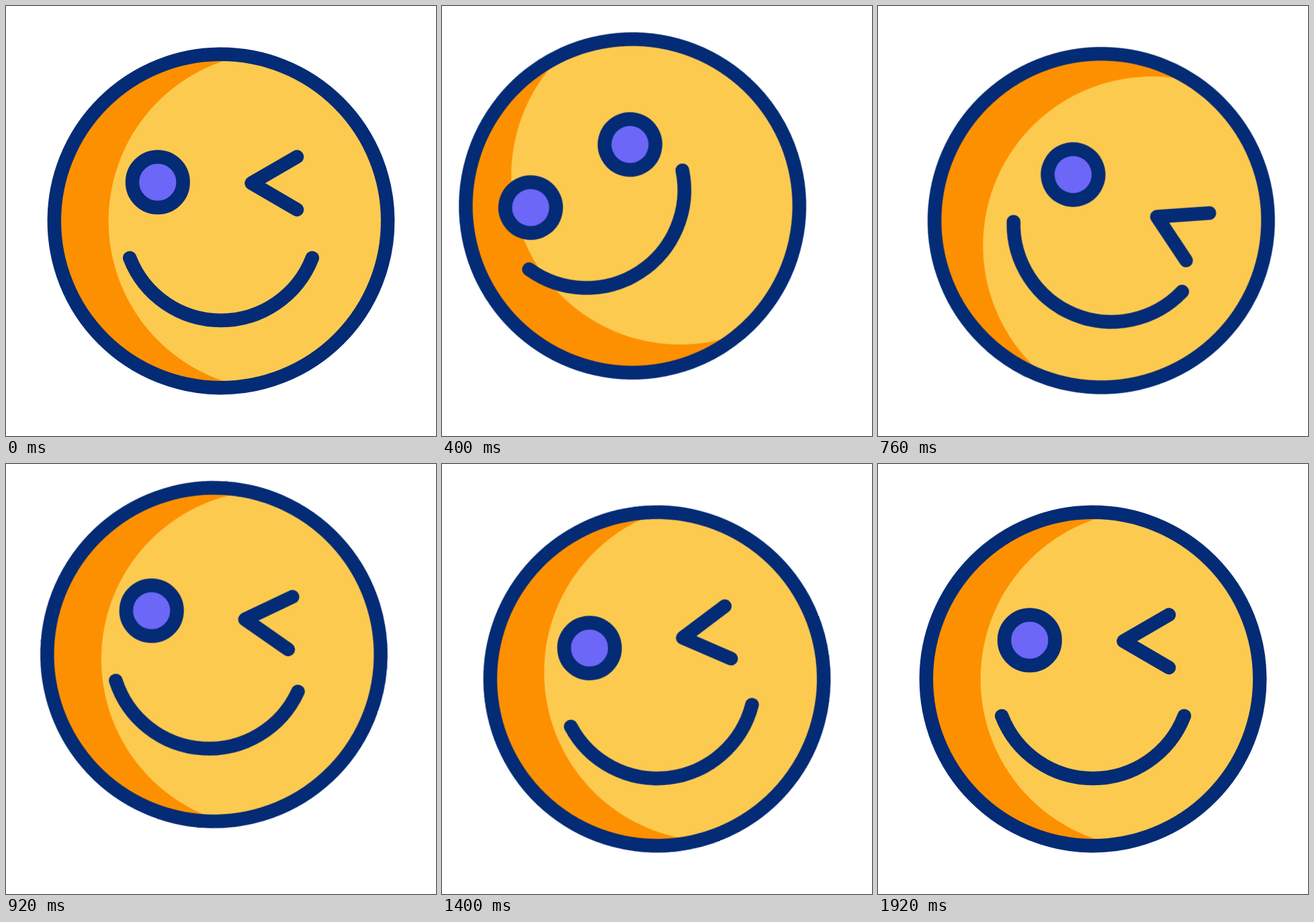
An HTML page without scripts for the animation above (2000 ms loop, 640 by 640 pixels).

```html
<!DOCTYPE html>
<html lang="en">
<head>
<meta charset="utf-8">
<title>Winking face</title>
<style>
  html, body { margin: 0; width: 100%; height: 100%; overflow: hidden; background: #fff; }
  svg { display: block; width: 100vw; height: 100vh; }

  .line { fill: none; stroke: #042b75; stroke-width: 20.5; stroke-linecap: round; stroke-linejoin: round; }
  .iris { fill: #6c67f7; }

  .anim { animation: 2s cubic-bezier(.333, 0, .667, 1) infinite; }
  .sway { animation-name: sway; }
  .bob { animation-name: bob; }
  .tilt { animation-name: tilt; }
  .eyes { animation-name: eyes; }
  .mouth { animation-name: mouth; }
  .open { animation-name: open; animation-timing-function: step-end; }
  .wink { animation-name: wink; animation-timing-function: step-end; }

  /* head position, split by axis so the path can curve */
  @keyframes sway {
    0%, 64.5%, 100% { transform: translateX(0); }
    18% { transform: translateX(-42px); }
    30% { transform: translateX(30px); animation-timing-function: cubic-bezier(.4, 0, .72, 1); }
    46% { transform: translateX(-10.5px); }
  }
  @keyframes bob {
    0%, 64.5%, 100% { transform: translateY(0); }
    18% { transform: translateY(-29.4px); animation-timing-function: cubic-bezier(.25, 0, .67, 1); }
    30% { transform: translateY(35.7px); }
    46% { transform: translateY(-36.3px); }
  }
  @keyframes tilt {
    0%, 97%, 100% { transform: rotate(0deg); }
    18% { transform: rotate(-35deg); }
    35% { transform: rotate(28.8deg); }
    54% { transform: rotate(-10deg); }
  }

  /* features slide over the head */
  @keyframes eyes {
    0%, 64.5%, 100% { transform: translate(0, 0); }
    18% { transform: translate(-41.7px, -25.2px); }
    30% { transform: translate(42.8px, 22.6px); }
    54% { transform: translate(-19.7px, -7.5px); }
  }
  @keyframes mouth {
    0%, 64.5%, 100% { transform: translate(0, 0) rotate(0deg); }
    18% { transform: translate(-51.4px, -63.7px) rotate(0deg); }
    30% { transform: translate(28.5px, -2.7px) rotate(-4.9deg); }
    54% { transform: translate(-20.5px, -9px) rotate(0deg); }
  }
  @keyframes open {
    0%, 24%, 100% { opacity: 0; }
    8% { opacity: 1; }
  }
  @keyframes wink {
    0%, 24%, 100% { opacity: 1; }
    8% { opacity: 0; }
  }
</style>
</head>
<body>
<svg viewBox="0 0 640 640">
  <defs>
    <clipPath id="disc"><circle r="244"/></clipPath>
    <g id="eye">
      <circle class="iris" r="32"/>
      <circle class="line" r="37.8"/>
    </g>
  </defs>
  <g transform="translate(320 320)">
    <g class="anim sway">
      <g class="anim bob">
        <g class="anim tilt">
          <circle r="246" fill="#fd9000"/>
          <g clip-path="url(#disc)">
            <circle cx="84" r="251.4" fill="#fdca50"/>
          </g>
          <circle class="line" r="248.2"/>
          <g class="anim eyes">
            <use href="#eye" x="-94.2" y="-57.7"/>
            <use class="anim open" href="#eye" x="81" y="-57.7"/>
            <path class="line anim wink" d="M113-95.5 45.5-56.3 113-17"/>
          </g>
          <g class="anim mouth">
            <path class="line" d="M-135.8 55A145.7 145.7 0 0 0 135.8 55"/>
          </g>
        </g>
      </g>
    </g>
  </g>
</svg>
</body>
</html>
```
